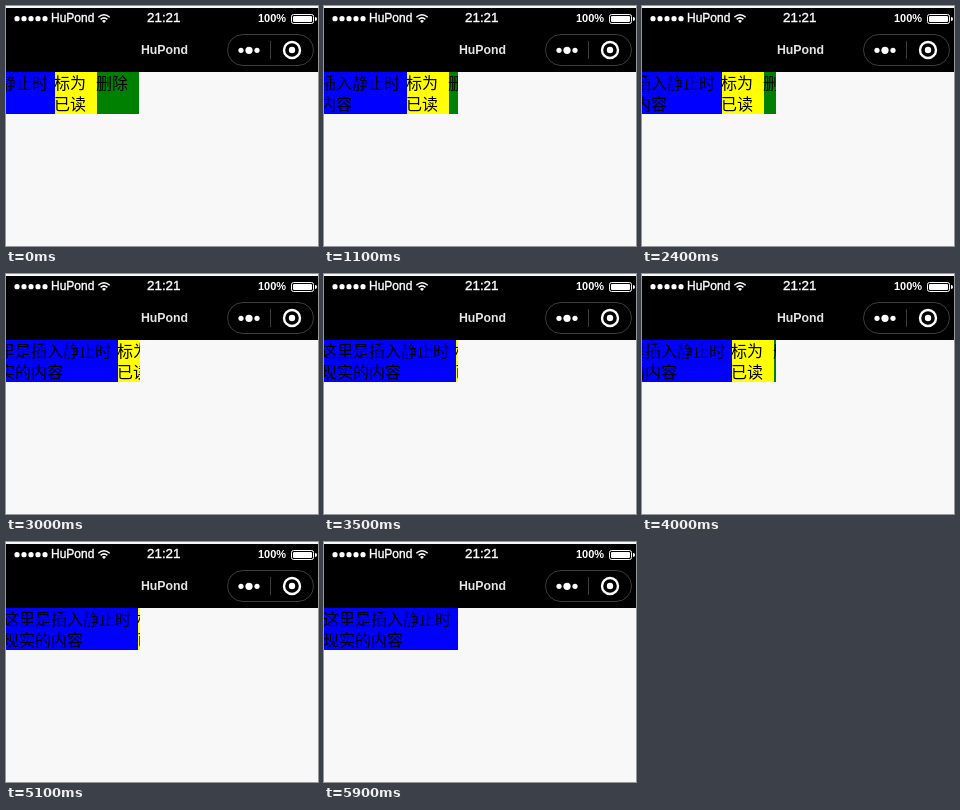
Write an HTML page that moves like this. It is 312 px wide and 240 px high and loops after 7300 ms.

```html
<!DOCTYPE html>
<html lang="zh-CN">
<head>
<meta charset="utf-8">
<title>Swipe actions</title>
<style>
  html, body { margin: 0; width: 100%; height: 100%; overflow: hidden; background: #f8f8f8; }
  svg { display: block; width: 312px; height: 240px; }
  text { font-family: "Liberation Sans", Arial, sans-serif; white-space: pre; }
  .medium { stroke: #fff; stroke-width: .35; }
  .row text { font: 16px "Noto Sans CJK SC", "Noto Sans CJK", sans-serif; fill: #000; }
</style>
</head>
<body>
<svg viewBox="0 0 312 240">
  <defs><clipPath id="view"><rect y="66" width="134" height="42"/></clipPath></defs>
  <rect width="312" height="240" fill="#f8f8f8"/>
  <rect y="2" width="312" height="64"/>

  <g id="status" fill="#fff">
    <g id="signal"></g>
    <text class="medium" x="45" y="16" font-size="12">HuPond</text>
    <g fill="none" stroke="#fff" stroke-width="1.5">
      <path d="M92.3 11.2Q98 6.2 103.7 11.2M94.6 13.4Q98 10.4 101.4 13.4"/>
    </g>
    <path d="M96 14.9Q98 13.3 100 14.9L98 17Z"/>
    <text class="medium" x="141" y="16" font-size="13.4">21:21</text>
    <text x="252" y="16" font-size="11" font-weight="bold">100%</text>
    <rect x="285.5" y="8.5" width="22" height="9" rx="2" fill="none" stroke="#fff"/>
    <rect x="287" y="10" width="19" height="6" rx="1"/>
    <path d="M309 11Q311 11 311 13T309 15Z"/>
  </g>

  <text x="158.5" y="48" font-size="12.3" font-weight="bold" text-anchor="middle" fill="#e4e4e4">HuPond</text>

  <g id="capsule" fill="#fff">
    <rect x="221.5" y="28.5" width="86" height="31" rx="15.5" fill="#000" stroke="#3c3c3c"/>
    <path d="M264.5 35V53" stroke="#3c3c3c"/>
    <circle cx="235" cy="44.3" r="2.6"/>
    <circle cx="243" cy="44.3" r="3.6"/>
    <circle cx="251" cy="44.3" r="2.6"/>
    <circle cx="286" cy="44" r="8" fill="none" stroke="#fff" stroke-width="2.4"/>
    <circle cx="286" cy="44" r="3.2"/>
  </g>

  <g clip-path="url(#view)"><g id="row" class="row"></g></g>
</svg>
<script>
  const NS = "http://www.w3.org/2000/svg";
  const LOOP = 7300, STEP = 100;

  // [time in ms, scroll offset in px]
  const DRAG = [
    [0, 85], [900, 85], [1400, 0], [1800, 85], [3000, 22], [3500, 2],
    [4500, 85], [5100, 2], [5500, 70], [5900, 0], [LOOP, 0]
  ];

  const row = document.getElementById("row");

  function add(parent, tag, attrs, content = "") {
    const el = document.createElementNS(NS, tag);
    for (const key in attrs) el.setAttribute(key, attrs[key]);
    el.textContent = content;
    parent.appendChild(el);
  }

  function cell(x, width, fill, lines) {
    add(row, "rect", { x, y: 66, width, height: 42, fill });
    lines.forEach((line, i) => add(row, "text", { x: x - 1, y: 83 + 21 * i }, line));
  }

  function offsetAt(time) {
    const t = Math.floor(time / STEP) * STEP;
    const i = DRAG.findIndex(([end]) => t < end);
    const [t0, a] = DRAG[i - 1], [t1, b] = DRAG[i];
    return Math.round(a + (b - a) * (t - t0) / (t1 - t0));
  }

  function draw(time) {
    row.setAttribute("transform", `translate(${-offsetAt(time)} 0)`);
  }

  const signal = document.getElementById("signal");
  for (let i = 0; i < 5; i++) add(signal, "circle", { cx: 11 + 7 * i, cy: 12.7, r: 2.6 });

  cell(0, 134, "#00f", ["这里是插入静止时", "现实的内容"]);
  cell(134, 42, "#ff0", ["标为", "已读"]);
  cell(176, 42, "#008000", ["删除"]);

  const start = performance.now();
  function tick() {
    draw((performance.now() - start) % LOOP);
    requestAnimationFrame(tick);
  }
  tick();
</script>
</body>
</html>
```
